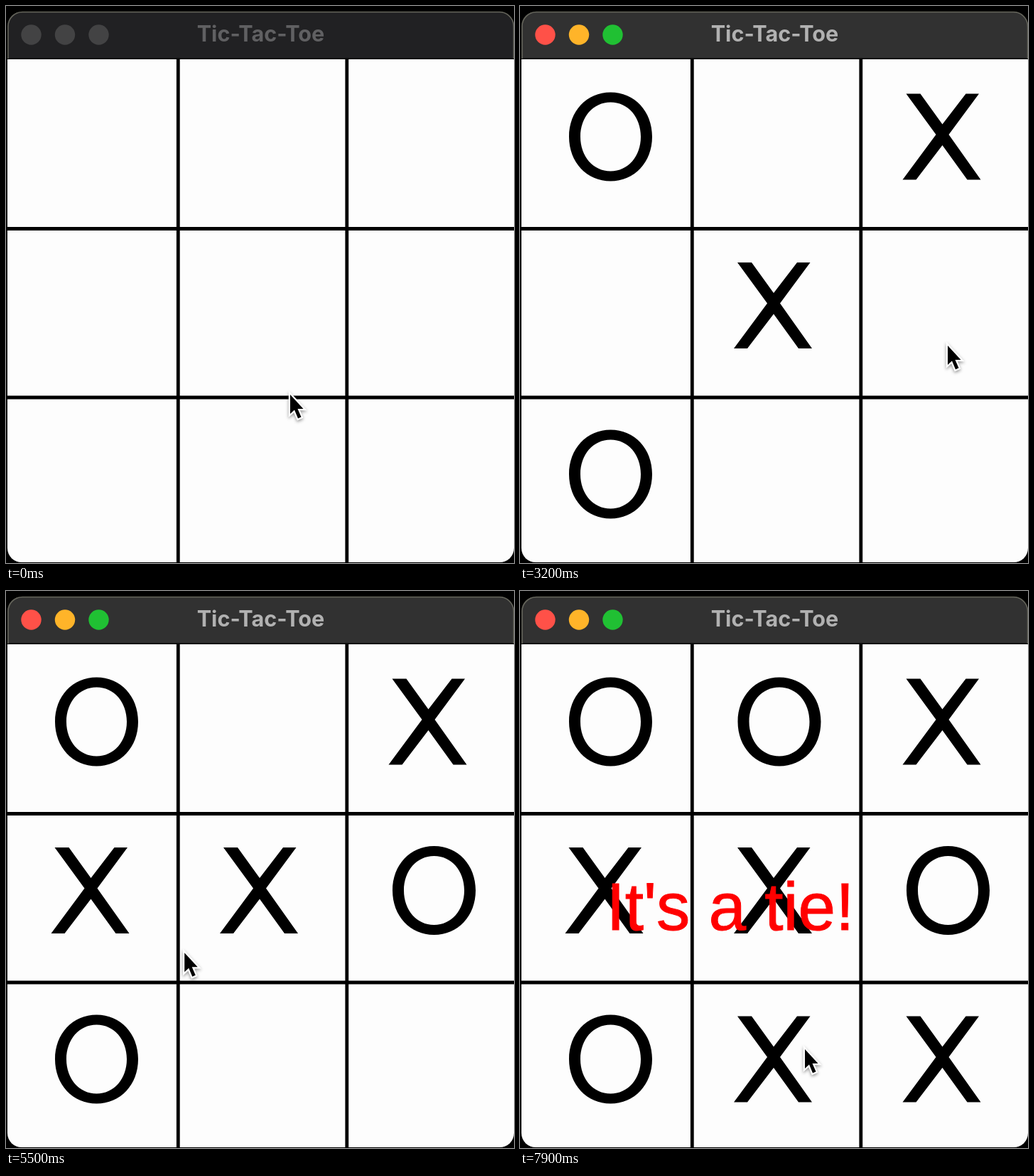
Animation, 715 px wide and 784 px high, one loop 8 s. Source, as an HTML page:

```html
<!DOCTYPE html>
<html lang="en">
<head>
<meta charset="utf-8">
<title>Tic-Tac-Toe</title>
<style>
  html, body { margin: 0; width: 100%; height: 100%; overflow: hidden; background: #000; }
  svg { display: block; width: 715px; height: 784px; }
  .bar { fill: #212123; }
  .light { fill: #434344; }
  .title { fill: #606062; font: 700 30.6px Inter, sans-serif; text-anchor: middle; }
  .active .bar { fill: #313131; }
  .active .light { fill: var(--on); }
  .active .title { fill: #b1b1b1; }
  .tie { fill: #f00; stroke: #f00; font: 94.5px "Liberation Sans", Arial, sans-serif; }
</style>
</head>
<body>
<svg id="stage" viewBox="0 0 715 784">
  <defs>
    <clipPath id="frame"><rect x="2" y="8" width="713" height="775" rx="20"/></clipPath>
    <path id="X" d="M301 482 348 418.500 306 361H326L357 404 390 361H408.500L366 418.500 411 482H392L357 433.500 320 482Z"/>
    <path id="O" fill-rule="evenodd" d=""/>
  </defs>
  <g clip-path="url(#frame)">
    <rect class="bar" width="715" height="76"/>
    <rect y="75" width="715" height="709" fill="#fdfdfd"/>
    <path d="M242.300 75V784M479.800 75V784M0 313.500H715M0 551H715" stroke="#000" stroke-width="4.800"/>
    <path d="M0 74H715" stroke="#0c0c0c" stroke-width="2"/>
  </g>
  <path d="M3 74V28.500A20 20 0 0 1 23 8.500H694A20 20 0 0 1 714.500 28.500V74" fill="none" stroke="#66665c" stroke-width="1.500"/>
  <circle class="light" cx="35.500" cy="40.500" r="14.200" style="--on:#ff5148"/>
  <circle class="light" cx="83" cy="40.500" r="14.200" style="--on:#ffb429"/>
  <circle class="light" cx="130.500" cy="40.500" r="14.200" style="--on:#20c033"/>
  <text class="title" x="358.500" y="50">Tic-Tac-Toe</text>
  <g id="marks"></g>
  <text class="tie" id="tie" x="121.500" y="477">It's a tie!</text>
  <g id="cursor" style="filter:drop-shadow(0 2px 2px #0006)">
    <path d="M2 4V31L8 25.500 13 37.500 17.500 35.500 12.500 24H20.500Z" fill="#000" stroke="#fff" stroke-width="4.500" paint-order="stroke"/>
  </g>
</svg>
<script>
const LOOP = 8000, STEP = 100, CELL = 237.5;
const FOCUS = 100, TIE = 7500;
const $ = id => document.getElementById(id);

// time, mark, column, row
const moves = [
  [1400, "X", 1, 1], [1500, "O", 0, 0],
  [2700, "X", 2, 0], [2800, "O", 0, 2],
  [5000, "X", 0, 1], [5100, "O", 2, 1],
  [6200, "X", 2, 2], [6300, "O", 1, 0],
  [7400, "X", 1, 2]
];

// time, x, y of the pointer; it eases between rests
const path = [
  [0, 398, 543], [500, 398, 543], [900, 400, 473], [1800, 400, 473],
  [2200, 458, 273], [2500, 590, 195], [2800, 590, 195],
  [3200, 600, 474], [4000, 600, 474], [4600, 162, 467], [5300, 162, 467],
  [6000, 602, 660], [6700, 602, 660], [7200, 399, 641], [8000, 399, 641]
];

// Rounded oval, slightly fuller than an ellipse
function oval(cx, cy, rx, ry) {
  const k = 0.575, a = rx * k, b = ry * k;
  return `M${cx - rx} ${cy}c0 ${-b} ${rx - a} ${-ry} ${rx} ${-ry}` +
    `s${rx} ${ry - b} ${rx} ${ry}s${a - rx} ${ry} ${-rx} ${ry}s${-rx} ${b - ry} ${-rx} ${-ry}z`;
}
$("O").setAttribute("d", oval(127.5, 184, 58.5, 62.5) + oval(127.5, 184, 42.5, 48.5));

const marks = moves.map(([time, mark, col, row]) => {
  const el = document.createElementNS("http://www.w3.org/2000/svg", "use");
  const home = mark === "X" ? 1 : 0;
  el.setAttribute("href", "#" + mark);
  el.setAttribute("x", (col - home) * CELL);
  el.setAttribute("y", (row - home) * CELL);
  $("marks").append(el);
  return { time, el };
});

function pointer(t) {
  const i = path.findIndex(p => p[0] > t);
  const [t0, x0, y0] = path[i - 1], [t1, x1, y1] = path[i];
  const u = (t - t0) / (t1 - t0), e = u * u * (3 - 2 * u);
  return [x0 + (x1 - x0) * e, y0 + (y1 - y0) * e];
}

const show = (el, on) => el.setAttribute("visibility", on ? "visible" : "hidden");

function draw(now) {
  const t = Math.floor((now % LOOP) / STEP) * STEP;
  $("stage").classList.toggle("active", t >= FOCUS);
  for (const m of marks) show(m.el, t >= m.time);
  show($("tie"), t >= TIE);
  $("cursor").setAttribute("transform", `translate(${pointer(t)})`);
}

const start = performance.now();
function tick() {
  draw(performance.now() - start);
  requestAnimationFrame(tick);
}
tick();
</script>
</body>
</html>
```
